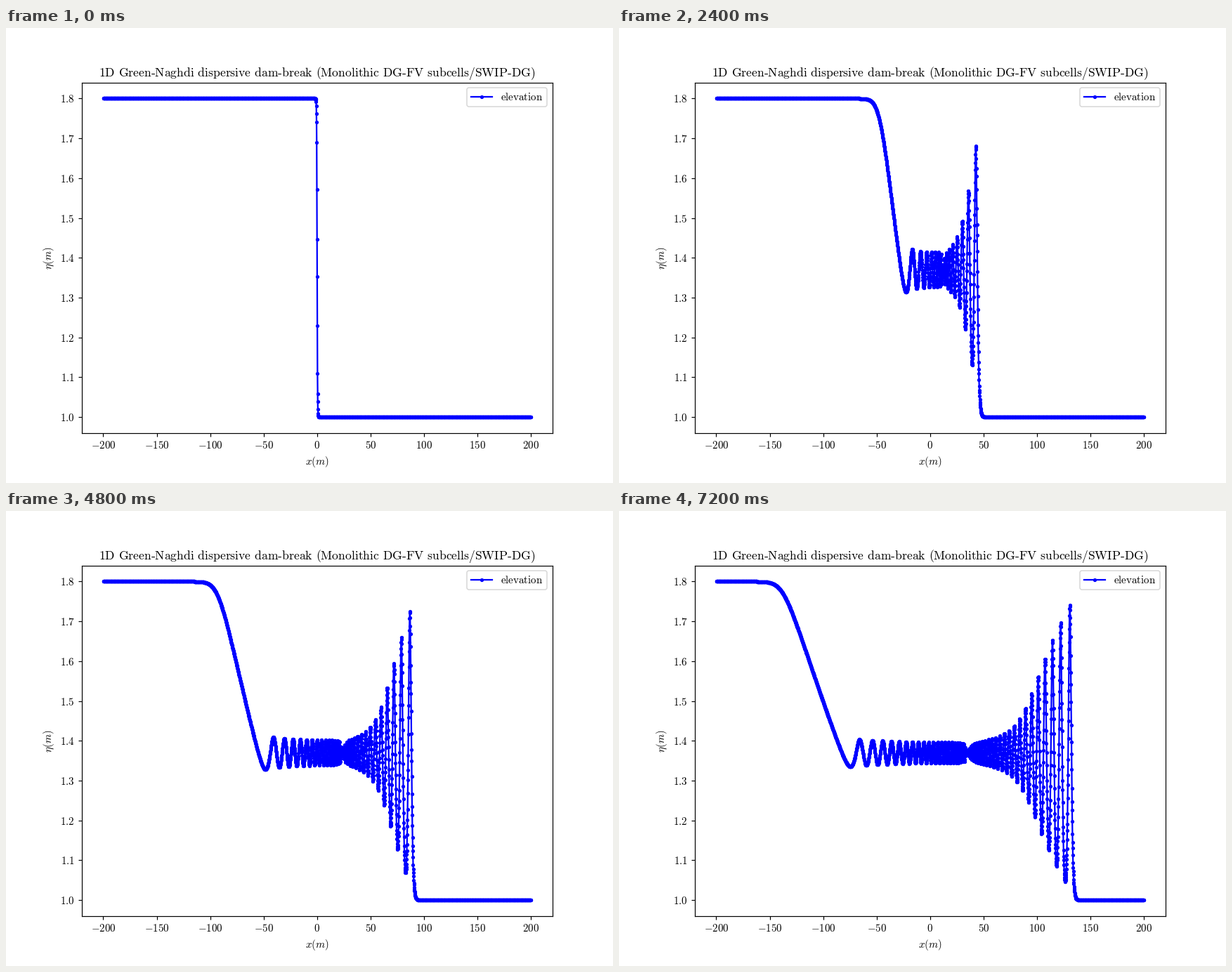
Recreate the animation shown at these times as a matplotlib script. Size 864 px wide and 648 px high, loop 7300 ms.

```python
import numpy as np
import matplotlib.pyplot as plt
from matplotlib.animation import FuncAnimation

# Serre / Green-Naghdi dam break, solved on a uniform grid
GRAVITY = 9.81
H_LEFT, H_RIGHT, SMOOTH = 1.8, 1.0, 0.4
DX = 0.125
GRID = np.arange(-170, 150 + DX / 2, DX)
FRAMES = 73
COURANT_STEP = 0.2574   # metres travelled by the fastest wave per step
MAX_STEPS = 900
END_CREST = 130.6       # position of the leading crest in the last frame
FILTER = 0.0015


def dam(x):
    mid, half = (H_LEFT + H_RIGHT) / 2, (H_LEFT - H_RIGHT) / 2
    return mid - half * np.tanh(x / SMOOTH)


def ddx(f):
    d = np.zeros_like(f)
    d[2:-2] = (f[:-4] - 8 * f[1:-3] + 8 * f[3:-1] - f[4:]) / (12 * DX)
    return d


def solve_tridiagonal(low, diag, high, rhs):
    """Parallel cyclic reduction; off-diagonals vanish after a few levels."""
    n = len(rhs)
    rows = np.stack([low, high, rhs]) / diag
    for level in range(8):
        s = 2 ** level
        padded = np.zeros((3, n + 2 * s))
        padded[:, s:-s] = rows
        before, after = padded[:, :n], padded[:, 2 * s:]
        a, c, d = rows
        scale = 1 / (1 - a * before[1] - c * after[0])
        rows = np.stack([-a * before[0],
                         -c * after[1],
                         d - a * before[2] - c * after[2]]) * scale
    return rows[2]


def velocity(state):
    h, momentum = state
    face = ((h[1:] + h[:-1]) / 2) ** 3 / (3 * DX ** 2)
    left = np.concatenate([face[:1], face])
    right = np.concatenate([face, face[-1:]])
    return solve_tridiagonal(-left, h + left + right, -right, momentum)


def rate(state, u=None):
    if u is None:
        u = velocity(state)
    h, momentum = state
    flux = (u * momentum + GRAVITY * h ** 2 / 2
            - 2 / 3 * h ** 3 * ddx(u) ** 2)
    return np.stack([-ddx(h * u), -ddx(flux)])


def advance(state):
    """One Runge-Kutta step whose length follows the fastest wave."""
    u = velocity(state)
    dt = COURANT_STEP / np.max(np.abs(u) + np.sqrt(GRAVITY * state[0]))
    k1 = rate(state, u)
    k2 = rate(state + dt / 2 * k1)
    k3 = rate(state + dt / 2 * k2)
    k4 = rate(state + dt * k3)
    state = state + dt / 6 * (k1 + 2 * k2 + 2 * k3 + k4)
    state[:, 3:-3] += FILTER * np.diff(state, 6, axis=1)
    return state


def simulate():
    state = np.stack([dam(GRID), np.zeros_like(GRID)])
    history = [state[0]]
    ahead = GRID > 20
    for _ in range(MAX_STEPS):
        state = advance(state)
        history.append(state[0])
        if GRID[ahead][np.argmax(state[0][ahead])] >= END_CREST:
            break
    return history


def sample_points(cells=720):
    """Midpoints of four Gauss-weighted subcells in every cell."""
    weights = np.polynomial.legendre.leggauss(4)[1] / 2
    mids = np.cumsum(weights) - weights / 2
    size = 400 / cells
    return (-200 + size * (np.arange(cells)[:, None] + mids)).ravel()


def roman(text):
    return rf"$\text{{{text}}}$"


def signed(value):
    sign = "-" if value < 0 else ""
    return rf"${sign}\mathrm{{{abs(value)}}}$"


plt.rcParams.update({"font.family": "Liberation Serif",
                     "mathtext.fontset": "cm"})

history = simulate()
points = sample_points()

fig, ax = plt.subplots(figsize=(8, 6), dpi=108)
line, = ax.plot(points, dam(points), "b.-", markersize=5,
                label=roman("elevation"))
ax.set_xlim(-220, 220)
ax.set_ylim(0.96, 1.84)
x_ticks = range(-200, 201, 50)
y_ticks = [1 + i / 10 for i in range(9)]
ax.set_xticks(x_ticks, [signed(v) for v in x_ticks])
ax.set_yticks(y_ticks, [rf"$\mathrm{{{v:.1f}}}$" for v in y_ticks])
ax.set_xlabel(r"$x(m)$")
ax.set_ylabel(r"$\eta(m)$")
ax.set_title(roman("1D Green-Naghdi dispersive dam-break "
                   "(Monolithic DG-FV subcells/SWIP-DG)"), fontsize=11.73)
ax.legend(loc="upper right")


def draw(frame):
    step = round(frame * (len(history) - 1) / (FRAMES - 1))
    line.set_ydata(np.interp(points, GRID, history[step]))
    return line,


anim = FuncAnimation(fig, draw, frames=FRAMES, interval=100, repeat=True)
plt.show()
```
